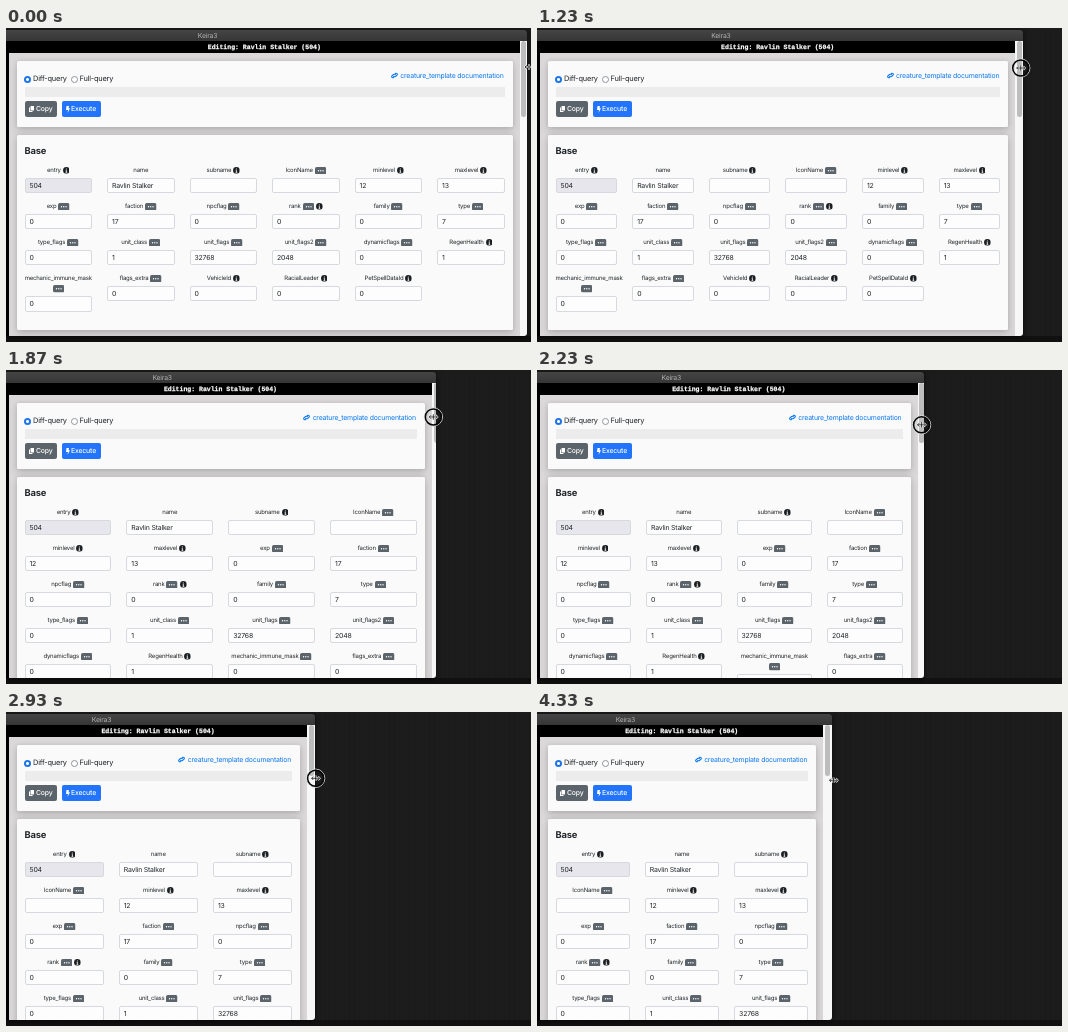
An HTML page for the animation above (4.36 s loop, 525 by 314 pixels).

```html
<!DOCTYPE html>
<html lang="en">
<head>
<meta charset="utf-8">
<title>Resizing editor window</title>
<style>
  html, body { margin: 0; width: 525px; height: 314px; overflow: hidden; }
  body {
    position: relative; color: #212529; text-rendering: geometricPrecision;
    font: 6.9px/10.5px Inter, "Liberation Sans", sans-serif; letter-spacing: -.028em;
    background: repeating-linear-gradient(90deg, #1c1c1c 0 2px, #1b1b1b 2px 5px);
  }
  body::after { content: ""; position: absolute; left: 0; right: 0; top: 308px; bottom: 0; background: #0006; }
  div, svg { box-sizing: border-box; }
  .abs, .bar, .head, .main, .thumb, .card, .win { position: absolute; }
  .win { left: -118px; top: 2px; height: 306px; overflow: hidden; background: #000; border-radius: 3px; box-shadow: 0 1px 5px #000a; }
  .bar { left: 0; right: 0; top: 0; height: 11px; background: linear-gradient(#454545, #363636); color: #b4b4b4; font-size: 6.8px; line-height: 12.5px; text-align: center; }
  .track { position: absolute; left: 121px; right: 0; top: 11px; bottom: 0; background: #f7f7f7; }
  .thumb { top: 0; width: 5px; border-radius: 2.5px; background: #bdbdbd; }
  .main { left: 121px; top: 11px; bottom: 0; overflow: hidden; background: #dad8d8; }
  .head { left: 0; right: 0; top: 0; height: 12px; background: #000; color: #fff; text-align: center; white-space: nowrap; letter-spacing: 0;
    font: bold 6.5px/13px "Liberation Mono", "DejaVu Sans Mono", monospace; -webkit-text-stroke: .25px #fff; }
  .card { left: 7.5px; right: 7px; background: #fafafa; border-radius: 1.5px; box-shadow: 0 4px 8px #00000026, 0 0 4px #0000001a; }
  .query { top: 20px; height: 66px; }
  .base { top: 93.5px; min-height: 195.5px; padding: 31.5px 8px 1px; }
  .base b { position: absolute; left: 8px; top: 12.5px; font-size: 9.4px; font-weight: 700; }
  .row { display: flex; flex-wrap: wrap; align-items: flex-start; margin: 0 -7.5px; }
  .col { padding: 0 7.5px 8.7px; }
  .label { font-size: 6px; text-align: center; margin-bottom: 1.3px; }
  .label svg { margin-left: .4px; vertical-align: middle; }
  .input { height: 15.5px; padding: 0 4px; border: 1px solid #d6d9dd; border-radius: 2px; background: #fdfdfd; line-height: 14px; white-space: nowrap; }
  .off { background: #e6e6ec; }
  .btn { top: 40px; height: 16px; border-radius: 2px; color: #fff; line-height: 16.5px; font-weight: 500; }
  .btn span { position: absolute; }
  .btn svg, .link svg { position: absolute; }
  .link { right: 9px; top: 9.8px; padding-left: 9px; color: #0a78f0; white-space: nowrap; }
  .radio { top: 14.7px; width: 7px; height: 7px; border-radius: 50%; border: 1px solid #8f959b; background: #fff; }
  .on { border: none; background: radial-gradient(#fff 1.2px, #1d74ea 1.7px); }
  .opt { top: 13px; font-size: 7.4px; white-space: nowrap; }
  #cursor { left: -12px; top: -12px; z-index: 2; }
</style>
</head>
<body>
<svg width="0" height="0" style="position:absolute">
  <symbol id="info" viewBox="0 0 14 14"><circle cx="7" cy="7" r="6.8" fill="#1c1f22"/><path d="M7 3v2M5.6 6.6H7V11M5.2 11H8.8" stroke="#fff" stroke-width="1.7"/></symbol>
  <symbol id="more" viewBox="0 0 23 15"><rect width="23" height="15" rx="3.5" fill="#5c646b"/><path d="M7 7.5h.1M11.5 7.5h.1M16 7.5h.1" stroke="#fff" stroke-width="2.6" stroke-linecap="round"/></symbol>
</svg>

<div class="win" id="win">
  <div class="bar">Keira3</div>
  <div class="track"><div class="thumb" id="thumb"></div></div>
  <div class="main" id="main">
    <div class="card query">
      <div class="abs radio on" style="left:7.5px"></div><div class="abs opt" style="left:16.5px">Diff-query</div>
      <div class="abs radio" style="left:54px"></div><div class="abs opt" style="left:63px">Full-query</div>
      <div class="abs link"><svg width="7" height="7" viewBox="0 0 14 14" style="left:-.5px;top:1.6px" fill="none" stroke="#0a78f0" stroke-width="2.1"><path d="M6 9 4.5 11.5A2.6 2.6 0 0 1 1.5 8L5 5a2.6 2.6 0 0 1 4 1M8 5l1.5-2.5A2.6 2.6 0 0 1 12.5 6L9 9A2.6 2.6 0 0 1 5 8"/></svg>creature_template documentation</div>
      <div class="abs" style="left:8px;right:8px;top:26px;height:9.5px;background:#ececec"></div>
      <div class="abs btn" style="left:8px;width:32px;background:#5c646b"><svg width="5" height="6" viewBox="0 0 10 12" style="left:4px;top:5px" fill="#fff"><path d="M3 0h7v9H3zM0 3h2v7h5v2H0z"/></svg><span style="left:11.5px">Copy</span></div>
      <div class="abs btn" style="left:45px;width:39px;background:#2174fb"><svg width="4" height="7" viewBox="0 0 8 14" style="left:4px;top:4.5px" fill="#fff"><path d="M1 0h5L5 4.5h3L3 14l1-6H0z"/></svg><span style="left:9.5px">Execute</span></div>
    </div>
    <div class="card base"><b>Base</b><div class="row" id="row"></div></div>
    <div class="head">Editing: Ravlin Stalker (504)</div>
  </div>
</div>

<svg class="abs" id="cursor" width="24" height="24" viewBox="-12 -12 24 24">
  <g id="ring" fill="none"><circle r="9.2" stroke="#dcdcdc" stroke-width=".9"/><circle r="8" stroke="#050505" stroke-width="1.5"/></g>
  <path id="arrow" d="M-4 0H4M-2.4-1.7-4 0-2.4 1.7M2.4-1.7 4 0 2.4 1.7M0-2.7V2.7" fill="none" stroke="#fff" stroke-width="1.9"/>
  <use href="#arrow" style="display:none"/>
  <path d="M-4 0H4M-2.4-1.7-4 0-2.4 1.7M2.4-1.7 4 0 2.4 1.7M0-2.7V2.7" fill="none" stroke="#111" stroke-width=".8"/>
</svg>

<script>
const $ = id => document.getElementById(id);
const LOOP = 4360, STEP = 100 / 3;

// name, value, icons (i = info, m = more)
const fields = `entry,504,i|name,Ravlin Stalker,|subname,,i|IconName,,m|minlevel,12,i|maxlevel,13,i
|exp,0,m|faction,17,m|npcflag,0,m|rank,0,mi|family,0,m|type,7,m
|type_flags,0,m|unit_class,1,m|unit_flags,32768,m|unit_flags2,2048,m|dynamicflags,0,m|RegenHealth,1,i
|mechanic_immune_mask,0,m|flags_extra,0,m|VehicleId,0,i|RacialLeader,0,i|PetSpellDataId,0,i`;

const icon = {
  i: ' <svg width="6.8" height="6.8"><use href="#info"/></svg>',
  m: ' <svg width="11.5" height="7.5"><use href="#more"/></svg>'
};
$('row').innerHTML = fields.split('|').map((f, n) => {
  const [name, value, icons] = f.trim().split(',');
  const marks = [...icons].map(c => icon[c]).join('');
  return `<div class="col"><div class="label">${name}${marks}</div><div class="input${n ? '' : ' off'}">${value}</div></div>`;
}).join('');
const cols = [...document.querySelectorAll('.col')];

// time, window edge, card edge, pointer x, pointer y
const path = [
  [0, 521, 506.6, 523, 39],
  [100, 521, 506.6, 523, 39],
  [590, 515.5, 502, 515.5, 39],
  [800, 508.8, 496.4, 509, 39],
  [1110, 494.5, 481, 494, 39.5],
  [1230, 486, 471.6, 484, 40],
  [1640, 453, 439.5, 450, 44],
  [1870, 430, 418.6, 427, 47],
  [2190, 393, 380, 391, 54],
  [2630, 327, 314, 325.5, 62.5],
  [2715, 322, 307.5, 321.5, 64],
  [3000, 305, 290, 306, 67],
  [3270, 295, 280.2, 296.5, 68],
  [3770, 294.7, 279.4, 296.5, 68.3],
  [LOOP, 294.7, 279.4, 296.5, 68.3]
];
const thumbSize = { 6: 76, 4: 60, 3: 51 };
const clamp = v => Math.max(0, Math.min(1, v));

function poseAt(t) {
  const k = path.findIndex(p => p[0] > t);
  const a = path[k - 1], b = path[k];
  const u = (t - a[0]) / (b[0] - a[0]);
  return a.map((v, i) => v + (b[i] - v) * u);
}

let shown = 0;
function draw(t) {
  const [, edge, card, x, y] = poseAt(t);
  const count = edge >= 482 ? 6 : edge >= 378 ? 4 : 3;
  $('win').style.width = edge + 118 + 'px';
  $('main').style.width = card + 4 + 'px';
  $('thumb').style.left = card + 5.6 + 'px';
  if (count !== shown) {
    shown = count;
    cols.forEach(c => c.style.width = 100 / count + '%');
    $('thumb').style.height = thumbSize[count] + 'px';
  }
  $('cursor').style.transform = `translate(${x}px, ${y}px)`;
  $('ring').style.opacity = Math.min(clamp((t - 100) / 200), clamp((4100 - t) / 250));
}

let start;
function tick(now) {
  start ??= now;
  const t = (now - start) % LOOP;
  draw(Math.min(LOOP - 1, Math.floor((t + 4) / STEP) * STEP));
  requestAnimationFrame(tick);
}
draw(0);
requestAnimationFrame(tick);
</script>
</body>
</html>
```
